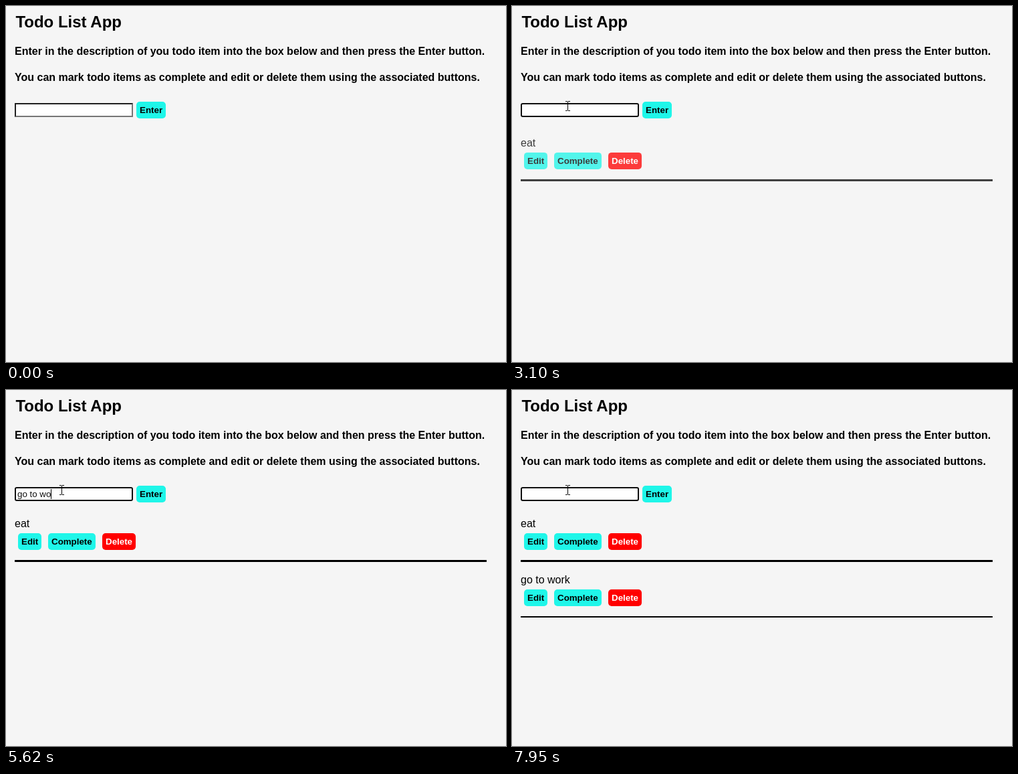
Write an HTML page that moves like this. It is 748 px wide and 532 px high and loops after 8000 ms.

```html
<!DOCTYPE html>
<html lang="en">
<head>
<meta charset="utf-8">
<title>Todo List App</title>
<style>
  html, body { margin: 0; width: 100%; height: 100%; overflow: hidden; background: #f5f5f5; }
  svg { display: block; width: 748px; height: 532px; }
  text { font: 16px "Liberation Sans", Arial, sans-serif; white-space: pre; }
  .bold { font-weight: bold; }
  .title { font-size: 24px; }
  .small { font-size: 13.333px; }
</style>
</head>
<body>
<svg id="stage" viewBox="0 0 748 532">
  <rect width="748" height="532" fill="#f5f5f5"/>
  <text class="bold title" x="14.4" y="32">Todo List App</text>
  <text class="bold" x="13" y="73">Enter in the description of you todo item into the box below and then press the Enter button.</text>
  <text class="bold" x="13" y="112">You can mark todo items as complete and edit or delete them using the associated buttons.</text>

  <g id="idle">
    <path fill="#767676" d="M13 145h177v21h-177z"/>
    <path fill="#212121" d="M13 145h177l-2 2h-173v17l-2 2z"/>
    <path fill="#fff" d="M15 147h173v17h-173z"/>
  </g>
  <rect id="focus" x="14" y="146" width="175" height="19" rx="2" fill="#fff" stroke="#101010" stroke-width="2"/>
  <text id="entry" class="small" x="17" y="160" fill="#111"></text>
  <rect id="caret" y="148" width="1" height="15"/>

  <g id="items"></g>

  <path id="arrow" d="M.5 .5v15.5l3.6-3.5 2.4 5.7 2.4-1-2.4-5.6h5z" fill="#fff" stroke="#000"/>
  <path id="beam" d="M-3 -8h3v1h1v-1h3v1h-3v13h3v1h-3v-1h-1v1h-3v-1h3v-13h-3z"/>
</svg>
<script>
const LOOP = 8000, FOCUS = 1040, BLINK = 526;
const CYAN = '#1ff6e9', RED = '#ff0000';
const el = id => document.getElementById(id);
const [idle, focusBox, entry, caret, items, arrow, beam] =
  ['idle', 'focus', 'entry', 'caret', 'items', 'arrow', 'beam'].map(el);

// Key times, submit time and repaint step of each todo
const todos = [
  { text: 'eat', keys: [2170, 2370, 2570], sent: 2900, step: 65, rule: 3 },
  { text: 'go to work', keys: [4420, 4620, 4880, 5080, 5150, 5350, 5480, 5620, 6140, 6350],
    sent: 6610, step: 67.5, rule: 2 }
];

// Pointer stops: time, x, y
const stops = [
  [360, 347, 316], [440, 235, 244], [520, 150, 190], [600, 104, 160],
  [690, 81, 147], [840, 83, 150], [1110, 83, 144], [1160, 83, 148], [1220, 83, 150]
];

const ruler = document.createElement('canvas').getContext('2d');
ruler.font = '13.333px "Liberation Sans", Arial, sans-serif';

const show = (node, on) => node.setAttribute('visibility', on ? 'visible' : 'hidden');
const place = (node, x, y) => node.setAttribute('transform', `translate(${x} ${y})`);

function button(x, y, width, label, fill = CYAN, ink = '#000') {
  return `<rect x="${x}" y="${y}" width="${width}" height="25" rx="5" fill="${fill}"/>
    <text class="bold small" x="${x + 5}" y="${y + 17}" fill="${ink}">${label}</text>`;
}

function todoMarkup({ text, rule }, i) {
  const y = 84 * i;
  return `<g><text x="13" y="${y + 205}">${text}</text>
    ${button(18, y + 214, 35, 'Edit')}
    ${button(63, y + 214, 71, 'Complete')}
    ${button(144, y + 214, 50, 'Delete', RED, '#fff')}
    <rect x="13" y="${y + 254}" width="706" height="${rule}"/></g>`;
}

items.innerHTML = todos.map(todoMarkup).join('');
items.insertAdjacentHTML('beforebegin', `<g>${button(195, 143, 44, 'Enter')}</g>`);

// cubic-bezier(.25, .1, .25, 1)
function ease(x) {
  if (x <= 0) return 0;
  if (x >= 1) return 1;
  const curve = (a, b, s) => 3 * a * s * (1 - s) ** 2 + 3 * b * s * s * (1 - s) + s ** 3;
  let lo = 0, hi = 1;
  for (let i = 0; i < 24; i++) {
    const mid = (lo + hi) / 2;
    if (curve(.25, .25, mid) < x) lo = mid; else hi = mid;
  }
  return curve(.1, 1, lo);
}

function drawInput(t) {
  const focused = t >= FOCUS;
  let typed = '', lastKey = FOCUS;
  for (const { text, keys, sent } of todos) {
    const hit = keys.filter(k => k <= t);
    if (!hit.length) break;
    lastKey = hit[hit.length - 1];
    typed = t < sent ? text.slice(0, hit.length) : '';
  }
  show(idle, !focused);
  show(focusBox, focused);
  entry.textContent = typed;
  caret.setAttribute('x', 17 + Math.floor(ruler.measureText(typed).width));
  show(caret, focused && Math.floor((t - lastKey) / BLINK) % 2 === 0);
}

function drawItems(t) {
  todos.forEach(({ sent, step }, i) => {
    const node = items.children[i];
    const age = Math.floor((t - sent + 5) / step) * step;
    const p = t < sent ? 0 : ease((age + 33) / 500);
    show(node, t >= sent);
    node.setAttribute('opacity', p);
    place(node, 0, 20 * (1 - p));
  });
}

function drawPointer(t) {
  const stop = stops.filter(s => s[0] <= t).pop();
  const [, x, y] = stop || [0, 0, 0];
  const overInput = x >= 13 && x < 190 && y >= 144 && y < 166;
  show(arrow, stop && !overInput);
  show(beam, stop && overInput);
  place(arrow, x, y);
  place(beam, x, y);
}

function draw(t) {
  drawInput(t);
  drawItems(t);
  drawPointer(t);
}

const start = performance.now();
function tick() {
  draw((performance.now() - start) % LOOP);
  requestAnimationFrame(tick);
}
tick();
</script>
</body>
</html>
```
